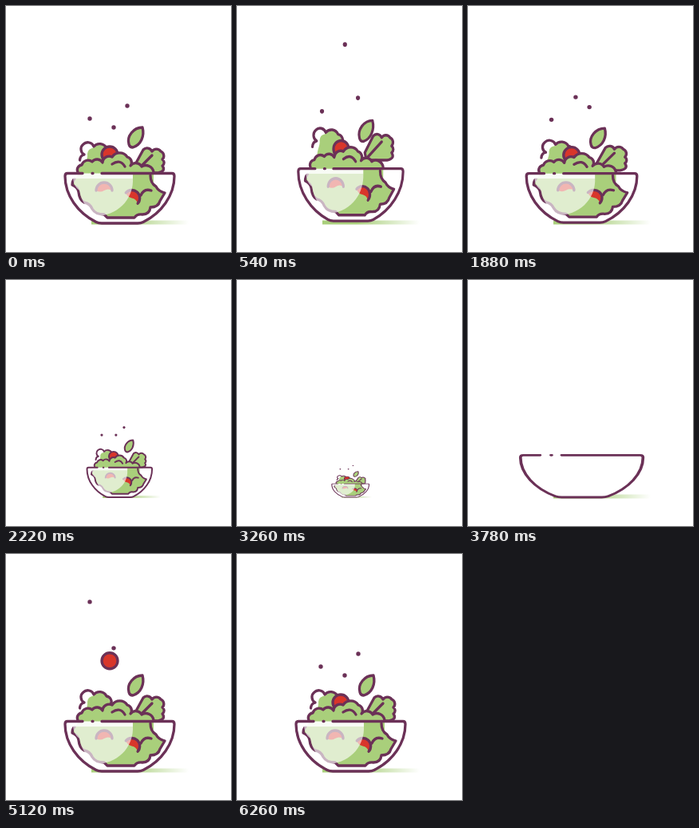
Write an HTML page that moves like this. It is 282x308 px and loops after 6420 ms.

```html
<!DOCTYPE html>
<html lang="en">
<head>
<meta charset="utf-8">
<title>Salad bowl</title>
<style>
  html, body { margin: 0; width: 100%; height: 100%; overflow: hidden; background: #fff; }
  svg { display: block; width: 100vw; height: 100vh; }
</style>
</head>
<body>
<svg id="stage" viewBox="0 0 282 308" fill="none" stroke-width="3.3" stroke-linecap="round" stroke-linejoin="round">
  <defs>
    <linearGradient id="fade" gradientUnits="userSpaceOnUse" x1="150" y1="0" x2="229" y2="0">
      <stop offset="0" stop-color="#a9cf7b"/>
      <stop offset="1" stop-color="#a9cf7b" stop-opacity="0"/>
    </linearGradient>
  </defs>
</svg>
<script>
const LOOP = 6420, INK = '#6b3157', GREEN = '#a9cf7b', RED = '#d8362b';
const CX = 142, FLOOR = 272, RIM = 209.5;
const CYCLE = 740, BURST = 3300, REFILL = 4380;
const stage = document.getElementById('stage');

// Drawing helpers
function add(parent, tag, attrs = {}) {
  const el = document.createElementNS('http://www.w3.org/2000/svg', tag);
  for (const k in attrs) el.setAttribute(k, attrs[k]);
  parent.appendChild(el);
  return el;
}
const fill = (g, d, color = GREEN) => add(g, 'path', { d, fill: color });
const line = (g, d) => add(g, 'path', { d, stroke: INK });
const shape = (g, d) => add(g, 'path', { d, fill: GREEN, stroke: INK });
const disc = (g, cx, cy, r, color, stroke = 'none') => add(g, 'circle', { cx, cy, r, fill: color, stroke });

// Wavy edge: outward arcs through the points
function waves(...points) {
  return points.map(([x, y], i) => {
    if (!i) return `M${x} ${y}`;
    const r = 0.6 * Math.hypot(x - points[i - 1][0], y - points[i - 1][1]);
    return `A${r} ${r} 0 0 1 ${x} ${y}`;
  }).join('');
}
function clover(r, n, turn) {
  const corner = (_, i) => [0, 1].map(q => 0.84 * r * Math.cos(turn + i * 2 * Math.PI / n - q * Math.PI / 2));
  return waves(...Array.from({ length: n + 1 }, corner));
}

// Easing helpers
const clamp = v => Math.max(0, Math.min(1, v));
const span = (t, a, b) => clamp((t - a) / (b - a));
const ramp = (t, a, b) => { const p = span(t, a, b); return p * p * (3 - 2 * p); };
const bump = (t, a, peak, b) => ramp(t, a, peak) - ramp(t, peak, b);
const back = p => 1 + 2.2 * (p - 1) ** 3 + 1.2 * (p - 1) ** 2;

// Scene, back to front
const shadow = add(stage, 'g');
fill(shadow, 'M107 268.500H229V273.500H107Z', 'url(#fade)');
const scene = add(stage, 'g');
const side = 'H208Q211 209.500 211 213C211 237 195 259 172 270.500Q169 272 165 272H120Q116 272 113 270.500C90 259 74 237 74 213Q74 209.500 77 209.500';
fill(scene, `M77 ${RIM}${side}`, '#fff');

const parts = [];
function part(opts, draw) {
  const g = add(scene, 'g');
  draw(g);
  parts.push({ g, amp: 0, x: CX, drift: 0, ...opts });
}
// Parts either grow out of the bowl in turn, or drop in to their resting height
const grower = (order, x, amp, draw) => part({ x, amp, rest: order ? RIM : 262, start: REFILL + 60 * order }, draw);
const faller = (x, rest, amp, start, land, draw, drift) => part({ x, rest, amp, start, land, drift, falls: true }, draw);

const dot = (x, y) => g => disc(g, x, y, 2.7, INK);
const wedge = (x, y, turn) => g => {
  const half = add(g, 'g', { transform: `translate(${x} ${y}) rotate(${turn})` });
  fill(half, 'M-10 2A10 10 0 0 1 10 2Q5 -1 0 2Q-5 5 -10 2Z', RED);
  line(half, 'M-10 2A10 10 0 0 1 10 2');
};

grower(3, 113, 10, g => {
  fill(g, 'M97 209C92 196 98 192 97 186Q92 173 104 171L112 177Q120 170 126 178C133 184 131 193 134 209Z', '#fff');
  fill(g, 'M99 209C97 198 103 192 102 185C103 177 109 179 112 176Q120 171 126 178C133 184 131 193 134 209Z');
  line(g, 'M92.500 193Q93 187 98 186' + waves([98, 186], [97, 173], [110, 176], [126, 178], [131, 189]));
});
grower(4, 178, 10, g => {
  shape(g, 'M161 200L172 180' + waves([172, 180], [183, 182], [194, 182], [196, 192], [196, 200]).slice(8) + 'Q201 207 190 209H163Z');
  line(g, 'M164 206L183 187');
});
faller(130, 186, 34, 4844, 5400, g => disc(g, 130, 186, 10, RED, INK));
grower(1, CX, 0, g => {
  const top = waves([90, 208], [95, 199], [108, 195], [121, 196], [133, 189], [152, 189], [156, 200], [170, 201], [185, 208]);
  fill(g, top + 'V220H90Z');
  line(g, top);
  line(g, 'M133 198Q143 191 149 201');
});
grower(0, CX, 0, g => {
  const leaf = 'M86 216Q83 219 83 224Q90 227 91 233Q92 243 98 246Q105 247 108 254Q112 261 123 261L127 265H161Q164 260 171 261Q180 261 181 252Q191 252 193 244L199 234Q191 232 188 226Q181 222 181 212';
  fill(g, leaf + 'H90Z');
  line(g, leaf);
  line(g, 'M169 237Q173 228 182 231');
});
faller(123, 229, 23, 4500, 4900, wedge(123, 229, 0));
faller(159, 239, 17, 4500, 4940, wedge(159, 239, 42));
faller(162, 164, 39, 4650, 5110, g =>
  shape(g, 'M171 152C160 152 151 163 154 173Q155 177 159 177C169 174 174 163 171 152Z'));
faller(105, 141, 49, 4752, 6020, dot(105, 141));
faller(152, 125, 48, 5100, 6020, dot(152, 125));
faller(135, 152, 84, 4672, 5480, dot(135, 152), -11);

// Loose greens tumbling in; y is the height at DROP
const DROP = 4260, SPEED = 0.6;
const bits = [];
function bit(x, y, draw) {
  const g = add(scene, 'g');
  draw(g);
  bits.push({ g, x, y });
}
const sprig = (x, y, r) => bit(x, y, g => {
  const outline = clover(r, r > 15 ? 6 : 4, x);
  fill(g, outline, '#fff');
  fill(g, clover(r * 0.8, 5, x)).setAttribute('transform', `translate(${r * 0.14} ${r * 0.16})`);
  line(g, outline);
});
sprig(83, 27, 7);
sprig(153, 17, 7.5);
sprig(163, 39, 7);
sprig(191, 35, 11);
sprig(133, 110, 20);
sprig(111, 243, 10);
sprig(143, 238, 19);
sprig(169, 240, 7);
sprig(142, 255, 8);
bit(178, 83, g => {
  shape(g, 'M-19 10Q-16 2 -16 -8C-15 -27 15 -27 16 -8V12Q13 15 9 13Q7 20 0 20Q-7 20 -10 13Q-15 14 -19 10Z');
  line(g, 'M1 -13L-1 8M2 -22L3 -29');
});
bit(93, 143, g => shape(g, 'M7 -11Q8 4 -7 9Q3 2 7 -11Z'));
bit(141, 134, g => line(g, 'M-7 -1Q0 4 8 -2'));
bit(187, 41, g => line(g, 'M-12 -8Q-5 9 12 6'));
bit(114, 94, g => disc(g, 0, 0, 2, GREEN));

// Glass in front of everything inside
fill(scene, 'M84 216H159C160 238 145 260 116 263C101 255 95 246 92 231Q85 226 84 216Z', '#fff').setAttribute('opacity', 0.64);
fill(scene, `M76 ${RIM}H159V216H76Z`, '#fff').setAttribute('opacity', 0.92);
line(scene, `M120 ${RIM}${side}H96M108 ${RIM}H109`);

// Each hop: rest, crouch, leap. The last one bursts back to full size.
const hopTime = t => t < 4 * CYCLE ? t % CYCLE : t - 4 * CYCLE;
const leapAt = t => bump(hopTime(t), 300, 575, CYCLE);
const sizeAt = t => 1 - 0.405 * ramp(t, 2020, 2220) - 0.285 * ramp(t, 2780, 2960) + 0.69 * ramp(t, BURST, BURST + 180);

function pose(t) {
  const s = sizeAt(t), leap = leapAt(t);
  const crouch = bump(hopTime(t), 110, 300, 450) + 1.25 * bump(t, 3640, 3760, 3960);
  return { s, sx: s * (1 + 0.1 * crouch - 0.043 * leap), sy: s * (1 - 0.13 * crouch + 0.05 * leap), dy: -3 * s * leap };
}

// The falling parts hang for a moment
const hang = t => t < 5120 ? t : Math.max(5120, t - 240);

function partState(p, t) {
  if (t < 3800) {
    const power = t < 2 * CYCLE ? 1 : t < 4 * CYCLE ? 1.12 : 1.38;
    const lift = power * (t < 3535 ? leapAt(t) : 1);
    return [p.drift * ramp(t, 300, 580) - p.amp * lift, 1 - ramp(t, 3540, 3760)];
  }
  if (t < p.start) return [0, 0];
  if (!p.falls) return [0, Math.max(0, back(span(t, p.start, p.start + 280)))];
  return [-(p.rest + 20) * (1 - span(hang(t), p.start, p.land)) ** 2, 1];
}

function show(g, on, transform) {
  g.setAttribute('display', on ? 'inline' : 'none');
  if (on) g.setAttribute('transform', transform);
}
const about = (x, y, dy, sx, sy = sx) => `translate(${x} ${y + dy}) scale(${sx} ${sy}) translate(${-x} ${-y})`;

function render(t) {
  const { s, sx, sy, dy } = pose(t);
  shadow.setAttribute('transform', about(CX, FLOOR, 0, s));
  scene.setAttribute('transform', about(CX, FLOOR, dy, sx, sy));
  for (const p of parts) {
    const [y, k] = partState(p, t);
    show(p.g, k > 0.01, about(p.x, p.rest, y, k));
  }
  for (const b of bits) {
    const y = Math.min(Math.max(b.y, 232), b.y + SPEED * (t - DROP));
    const x = b.x + (CX - b.x) * 0.6 * span(y, b.y, b.y + 200);
    const k = 1 - span(t, 4540, 4630);
    show(b.g, t > 3800 && y > -35 && k > 0, `translate(${x} ${y}) scale(${k})`);
  }
}

const start = performance.now();
function frame() {
  render((performance.now() - start) % LOOP);
  requestAnimationFrame(frame);
}
render(0);
requestAnimationFrame(frame);
</script>
</body>
</html>
```
